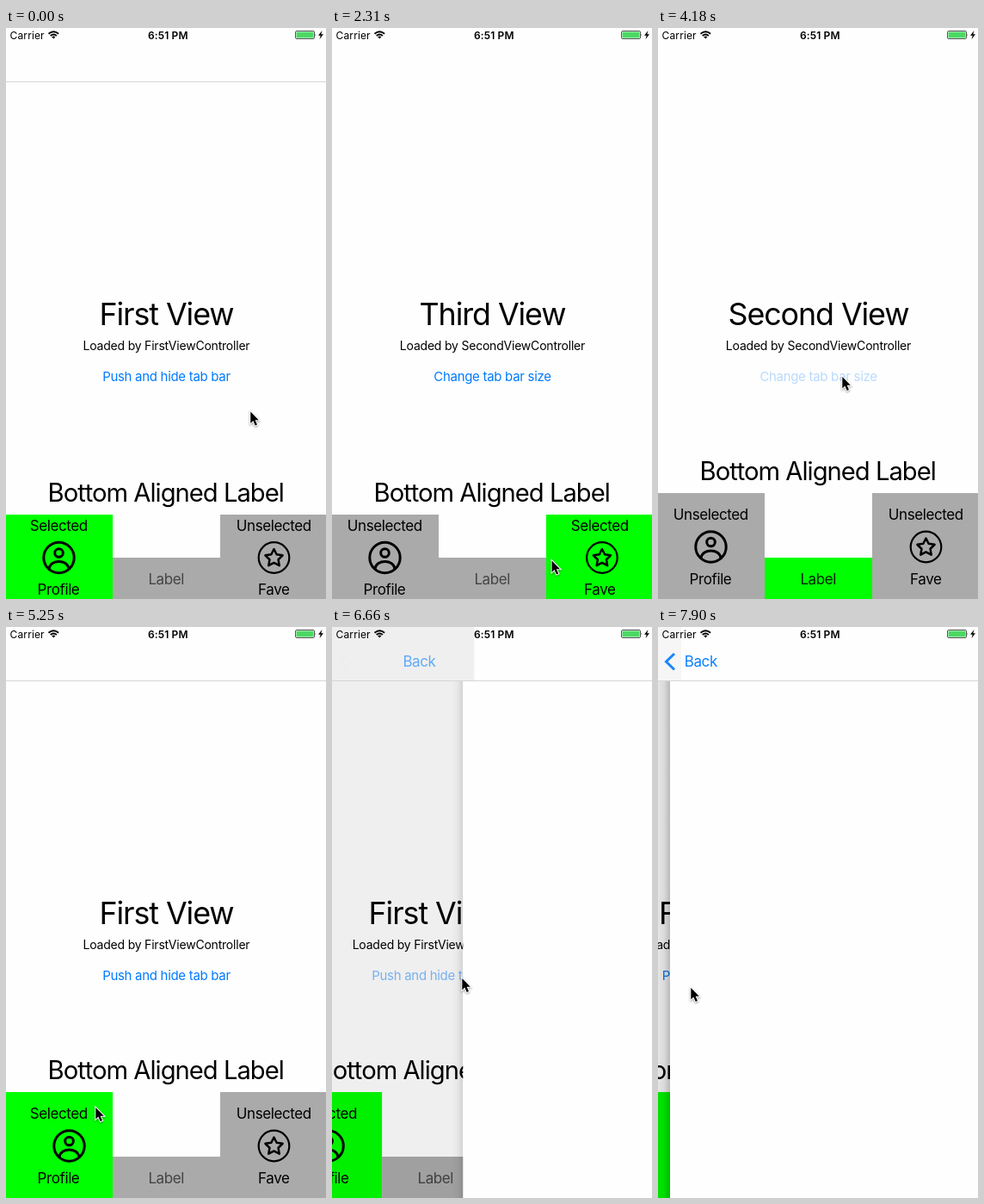
Recreate the animation shown at these times as an HTML page. Size 372 by 663 pixels, loop 7.99 s.

```html
<!DOCTYPE html>
<html lang="en">
<head>
<meta charset="utf-8">
<title>Tab bar demo</title>
<style>
html, body { margin: 0; width: 100%; height: 100%; overflow: hidden; background: #fefefe; }
svg { display: block; width: 372px; height: 663px; }
text { font-family: Inter, "Liberation Sans", sans-serif; font-size: 17px; letter-spacing: -.024em; }
.mid text { text-anchor: middle; }
.bar text { font-size: 12px; letter-spacing: .012em; }
.icon { fill: none; stroke: #000; stroke-linejoin: round; stroke-linecap: round; }
</style>
</head>
<body>
<svg viewBox="0 0 372 663">
  <defs>
    <linearGradient id="shade">
      <stop offset="0" stop-opacity="0"/>
      <stop offset=".5" stop-opacity=".05"/>
      <stop offset="1" stop-opacity=".2"/>
    </linearGradient>
  </defs>
  <rect width="372" height="663" fill="#fefefe"/>

  <g id="view" class="mid">
    <text id="heading" x="186.5" y="344.500" style="font-size:35.8px;letter-spacing:-.03em"></text>
    <text id="loaded" x="186.5" y="374" style="font-size:14px;letter-spacing:-.015em"></text>
    <text id="link" x="186.5" y="410" fill="#007aff" style="font-size:15px;letter-spacing:-.02em"></text>
    <text id="bottom" x="185.7" y="550" style="font-size:29.2px;letter-spacing:-.034em">Bottom Aligned Label</text>
    <rect id="leftBg" width="124" height="123"/>
    <rect id="midBg" x="124" y="615" width="125" height="48"/>
    <rect id="rightBg" x="249" width="123" height="123"/>
    <text id="midText" x="186.2" y="646">Label</text>
    <text id="leftState" x="61.3"></text>
    <text id="rightState" x="311.3"></text>
    <text id="leftName" x="61">Profile</text>
    <text id="rightName" x="311.3">Fave</text>
    <g id="person" class="icon" stroke-width="3">
      <circle r="17.7"/>
      <circle cy="-5.5" r="4.8"/>
      <path d="M-11.5 13C-10 1.5 10 1.5 11.5 13"/>
    </g>
    <g id="fave" class="icon" stroke-width="2.2">
      <circle r="17.8"/>
      <path id="star" stroke-width="2.5"/>
    </g>
  </g>

  <g id="page">
    <rect id="dim" y="62" height="601"/>
    <rect id="shadow" y="62" width="14" height="601" fill="url(#shade)"/>
    <rect id="sheet" y="62" width="372" height="601" fill="#fefefe"/>
    <rect width="372" height="62" fill="#fefefe"/>
    <rect id="navDim" height="62"/>
    <path id="chevron" d="M19 31L9.500 40.200L19 49.500" fill="none" stroke="#007aff" stroke-width="3"/>
    <text id="back" y="46" fill="#007aff">Back</text>
  </g>
  <rect id="line" y="62" width="372" height="1" fill="#d6d6d6"/>

  <g class="bar">
    <text x="4.500" y="12.500">Carrier</text>
    <text x="188.3" y="12.500" text-anchor="middle" font-weight="600">6:51 PM</text>
  </g>
  <g fill="none" stroke="#000" stroke-width="1.800">
    <path d="M49.500 6.700Q55.300 1.700 61.100 6.700M51.700 9Q55.300 6 58.900 9"/>
    <path d="M53.200 10.300Q55.300 8.700 57.400 10.300L55.300 12.500Z" fill="#000" stroke="none"/>
  </g>
  <rect x="336.500" y="3.500" width="22" height="9" rx="1.500" fill="#fff" stroke="#555" stroke-width="1"/>
  <rect x="337.500" y="4.500" width="20" height="7" rx=".5" fill="#4cd964"/>
  <path d="M359.500 6.500q1.600 1.500 0 3z" fill="#555"/>
  <path d="M367.500 3L363 8.800h2.700L364.500 13L369 7.200h-2.700Z"/>

  <path id="cursor" d="M.8 1v13.400l3-2.800 2.400 5.400 2.300-1-2.400-5.200h4.200Z" stroke="#fff" stroke-width="2"
    style="paint-order:stroke;filter:drop-shadow(0 1px 1px #0006)"/>
</svg>
<script>
const LOOP = 7990, TICK = 88.78;   // the screen refreshes once per tick
const $ = id => document.getElementById(id);
const set = (id, attrs) => { for (const k in attrs) $(id).setAttribute(k, attrs[k]); };
const clamp = v => Math.max(0, Math.min(1, v));

$('star').setAttribute('d', 'M' + Array.from({ length: 10 }, (_, i) => {
  const r = i % 2 ? 5.3 : 10.6, a = i * Math.PI / 5;
  return [r * Math.sin(a), .6 - r * Math.cos(a)].map(v => v.toFixed(2));
}).join('L') + 'Z');

// tick, x, y
const path = [
  [6, 283.5, 444.5], [10, 199, 530], [15, 292.5, 601], [20, 292.5, 601], [21, 292.5, 602],
  [22, 292.5, 602], [30, 217, 633], [31, 218.5, 633], [36, 218.5, 633], [45, 213.5, 404],
  [47, 213.5, 404], [55, 104, 556], [56, 103.5, 557], [59, 103.5, 557], [68, 150.5, 407],
  [75, 150.5, 407], [82, 3, 420], [85, 8.5, 419], [86, 8.5, 419], [87, 12, 418], [89, 37.5, 418]
];

function cursorAt(k) {
  let i = path.findIndex(p => p[0] >= k);
  if (i < 1) i = 1;
  const [t0, x0, y0] = path[i - 1], [t1, x1, y1] = path[i];
  const u = clamp((k - t0) / (t1 - t0)), e = u * u * (3 - 2 * u);
  return [x0 + (x1 - x0) * e, y0 + (y1 - y0) * e];
}

const views = {
  left: ['First View', 'Loaded by FirstViewController', 'Push and hide tab bar'],
  mid: ['Second View', 'Loaded by SecondViewController', 'Change tab bar size'],
  right: ['Third View', 'Loaded by SecondViewController', 'Change tab bar size']
};

function linkAlpha(k) {
  const [press, release] = k < 60 ? [45, 46.65] : [73, 73.5];
  return k < press ? 1 : .2 + .8 * clamp((k - release) / 4);
}

// left edge of the pushed page, as a share of the width
function pageEdge(k) {
  if (k < 83) return k < 73.75 ? 1 : Math.exp((73.75 - k) / 1.4);
  return k < 88 ? 0 : (k < 89 ? 5 : 14) / 372;
}

const wiggle = d => d < 0 || d > 8 ? 0 : 12 * Math.cos(d * 1.6) * Math.exp(-d / 2.5);

function draw(k) {
  const tab = k < 22 || k >= 59 ? 'left' : k < 33 ? 'right' : 'mid';
  const big = k >= 47, low = big ? 12.5 : 0;
  ['heading', 'loaded', 'link'].forEach((id, i) => $(id).textContent = views[tab][i]);
  for (const side of ['left', 'mid', 'right']) set(side + 'Bg', { fill: side === tab ? '#0f0' : '#aaa' });
  for (const side of ['left', 'right']) {
    set(side + 'Bg', { y: big ? 540 : 565 });
    set(side + 'State', { y: 583.5 - low });
    set(side + 'Name', { y: 658 - low });
    $(side + 'State').textContent = side === tab ? 'Selected' : 'Unselected';
  }
  set('midText', { fill: tab === 'mid' ? '#020' : '#444' });
  set('bottom', { y: big ? 525 : 550 });
  set('link', { opacity: linkAlpha(k) });
  set('person', { transform: `translate(${61.5 + wiggle(k - 59)} ${615 - low})` });
  set('fave', { transform: `translate(${311.5 + wiggle(k - 22)} ${615 - low})` });

  const q = pageEdge(k), x = q * 372;
  set('view', { transform: `translate(${-.3 * (372 - x)} 0)` });
  set('page', { visibility: q < 1 ? 'visible' : 'hidden' });
  set('dim', { width: x, opacity: .1 * (1 - q) });
  set('shadow', { x: x - 14, opacity: 1 - q });
  set('sheet', { x });
  set('navDim', { width: q ? x + 13 : 0, opacity: Math.min(.06, .03 + .08 * q) });
  set('chevron', { opacity: clamp(1 - 2.4 * q) });
  set('back', { x: 25.5 + 139 * q, opacity: 1 - q });
  set('line', { visibility: tab === 'left' ? 'visible' : 'hidden' });
  set('cursor', { transform: `translate(${cursorAt(k)})` });
}

function frame() {
  draw(Math.min(89, Math.floor(performance.now() % LOOP / TICK + .03)));
  requestAnimationFrame(frame);
}
frame();
</script>
</body>
</html>
```
